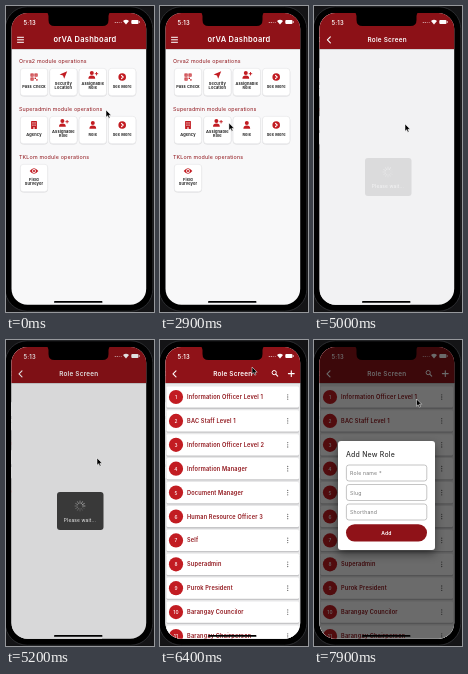
These frames come from a looping animation (148 px wide and 306 px high, 8000 ms). An HTML page:

```html
<!DOCTYPE html>
<html lang="en">
<head>
<meta charset="utf-8">
<title>Dashboard demo</title>
<style>
html, body { margin: 0; width: 100%; height: 100%; overflow: hidden; background: #141416; }
svg { display: block; width: 100vw; height: 100vh; }
text { font-family: Inter, "Open Sans", sans-serif; dominant-baseline: central; letter-spacing: .035em; }
</style>
</head>
<body>
<svg id="stage" viewBox="0 0 148 306"></svg>
<script>
const RED = '#8f1218', BRIGHT = '#c21c22';
const LOOP = 8000;

// Markup helpers
const rect = (x, y, w, h, fill, r = 0, more = '') =>
  `<rect x="${x}" y="${y}" width="${w}" height="${h}" rx="${r}" fill="${fill}" ${more}/>`;
const circle = (x, y, r, fill, more = '') =>
  `<circle cx="${x}" cy="${y}" r="${r}" fill="${fill}" ${more}/>`;
const path = (d, fill, more = '') => `<path d="${d}" fill="${fill}" ${more}/>`;
const line = (d, color, width = 1) =>
  path(d, 'none', `stroke="${color}" stroke-width="${width}" stroke-linecap="round" stroke-linejoin="round"`);
const text = (s, x, y, size, fill, weight = 400, anchor = 'start') =>
  `<text x="${x}" y="${y}" font-size="${size}" fill="${fill}" font-weight="${weight}" text-anchor="${anchor}">${s}</text>`;
const group = (id, body) => `<g id="${id}">${body}</g>`;

// Tile icons, drawn around 0,0
const person = circle(0, -2, 2, BRIGHT) + path('M-3.4 3.8Q-3.4 .6 0 .6T3.4 3.8Z', BRIGHT);
const icons = {
  blocks: [[-3.5, -3.5], [.5, -3.5], [-3.5, .5]].map(([x, y]) =>
    rect(x + .5, y + .5, 2.1, 2.1, 'none', 0, `stroke="${BRIGHT}"`)).join('') +
    rect(.6, .6, 1.4, 1.4, BRIGHT) + rect(2.2, 2.2, 1.4, 1.4, BRIGHT),
  arrow: path('M3.8-3.8L.8 3.8L-.4.4L-3.8-.6Z', BRIGHT),
  person,
  addPerson: `<g transform="translate(-1 0)">${person}</g>` + line('M2.4-1.3h2.6M3.7-2.6v2.6', BRIGHT, .9),
  more: circle(0, 0, 3.8, BRIGHT) + line('M-.7-1.7L1 0L-.7 1.7', '#fff', 1.1),
  building: rect(-2.9, -4, 5.8, 8, BRIGHT, .5) +
    [-2.6, -.4].map(y => rect(-1.6, y, 1.1, 1.1, '#fff') + rect(.5, y, 1.1, 1.1, '#fff')).join('') +
    rect(-.6, 2.2, 1.2, 1.8, '#fff'),
  eye: path('M-4.3 0Q0-5.6 4.3 0Q0 5.6-4.3 0Z', BRIGHT) + circle(0, 0, 1.9, '#fff') + circle(0, 0, 1.1, BRIGHT)
};

function tile(col, y, icon, label) {
  const x = 14 + col * 29.4, mid = x + 14, rows = label.split('|');
  const two = rows.length > 1;
  return rect(x, y + .5, 28, 28, '#dcdcde', 3.4) +
    rect(x + .3, y + .3, 27.4, 27.4, '#fff', 3.2, 'stroke="#e2e2e4" stroke-width=".5"') +
    `<g transform="translate(${mid} ${y + (two ? 7 : 9)})">${icons[icon]}</g>` +
    rows.map((s, i) => text(s, mid, y + (two ? 15.2 + i * 4.5 : 18), 3.9, '#222', 700, 'middle')).join('');
}

const section = (title, y, tiles) => text(title, 13, y, 5.3, RED) +
  tiles.map(([icon, label], i) => tile(i, y + 7, icon, label)).join('');

const header = (title, x, size) => rect(5, 43, 136, 1, '#0002') + rect(5, 6, 136, 37, RED) +
  text(title, x, 33.8, size, '#fff', 600, 'middle');

const dashboard = rect(5, 6, 136, 294, '#f8f8f9') + header('orVA Dashboard', 79, 7.5) +
  line('M11.5 31.3h6M11.5 33.8h6M11.5 36.3h6', '#fff', 1) +
  section('Orva2 module operations', 55, [['blocks', 'Pass Check'], ['arrow', 'Security|Location'],
    ['addPerson', 'Assignable|Role'], ['more', 'See More']]) +
  section('Superadmin module operations', 103, [['building', 'Agency'], ['addPerson', 'Assignable|Role'],
    ['person', 'Role'], ['more', 'See More']]) +
  section('TKLom module operations', 151, [['eye', 'Field|Surveyor']]);

const roles = ['Information Officer Level 1', 'BAC Staff Level 1', 'Information Officer Level 2',
  'Information Manager', 'Document Manager', 'Human Resource Officer 3', 'Self', 'Superadmin',
  'Purok President', 'Barangay Councilor', 'Barangay Chairperson'];

const roleRow = (name, i) => {
  const y = 57 + i * 23.9;
  return rect(6.5, y - 9.5, 132.5, 21.4, '#c6c6c8', 1.5) + rect(6.5, y - 10.6, 132.5, 21.2, '#fff', 1.5) +
    circle(16, y, 7.1, BRIGHT) + text(i + 1, 16, y, 4.8, '#fff', 500, 'middle') +
    text(name, 27, y, 5.6, RED, 600) +
    [-2.2, 0, 2.2].map(d => circle(127.7, y + d, .65, '#6d6d6d')).join('');
};

const rolePage = rect(5, 6, 136, 294, '#f6f6f7') +
  group('list', rect(5, 43, 136, 257, '#e8e8e9') + roles.map(roleRow).join('')) +
  header('Role Screen', 72.8, 6.4) + line('M16 30.8L13 33.8L16 36.8', '#fff', 1.1) +
  group('actions', circle(114.2, 32.6, 2.1, 'none', 'stroke="#fff" stroke-width="1"') +
    line('M115.9 34.3L117.7 36.2', '#fff', 1.1) + line('M128.4 33.6h5.8M131.3 30.7v5.8', '#fff', 1.1));

const ticks = Array.from({length: 12}, (_, i) =>
  `<line y1="-2.6" y2="-5" stroke="#fff" stroke-width=".7" stroke-linecap="round" opacity="${.12 + i * .05}" transform="rotate(${i * 30})"/>`).join('');
const loader = rect(5, 6, 136, 294, '#000', 0, 'opacity=".12"') + rect(51, 152, 46.5, 38, '#393939', 3) +
  `<g transform="translate(74 166)">${group('spinner', ticks)}</g>` +
  text('Please wait...', 74, 179.5, 4.8, '#eee', 400, 'middle');

const field = (label, y) => rect(32.4, y, 80.4, 16, '#fff', 2.5, 'stroke="#959595" stroke-width=".55"') +
  text(label, 36, y + 8, 5.2, '#7a7a7a');
const dialog = rect(24, 101, 97, 109, '#fff', 3, 'style="filter:drop-shadow(0 4px 5px #0007)"') +
  text('Add New Role', 32, 114, 6.9, '#333', 500) +
  field('Role name *', 125) + field('Slug', 144.5) + field('Shorthand', 164) +
  rect(32, 184.2, 81, 17.2, RED, 8.6) + text('Add', 72.5, 193, 5, '#fff', 600, 'middle');

const statusBar = text('5:13', 17.5, 16, 5.8, '#fff', 600) +
  [0, 1, 2, 3].map(i => circle(109.3 + i * 2, 16.5, .6, '#fff', `opacity="${i < 2 ? .8 : .5}"`)).join('') +
  path('M117 15Q120 12.6 123 15L120 18.4Z', '#fff') +
  rect(125.3, 14, 7.2, 4, '#fff', 1) + rect(133, 15.2, .7, 1.6, '#fff');

const stage = document.getElementById('stage');
stage.innerHTML =
  `<clipPath id="screen">${rect(5.5, 7, 134.7, 291.8, '#000', 16)}</clipPath>` +
  rect(-.8, .8, 147.6, 304.4, '#000', 22, 'stroke="#343539" stroke-width=".8"') +
  `<g clip-path="url(#screen)">` +
  group('home', dashboard) + group('role', rolePage) + statusBar + group('loader', loader) +
  group('splash', circle(131.3, 33.5, 10.3, '#fff', 'opacity=".2"')) +
  group('barrier', rect(5, 6, 136, 294, '#000')) + group('dialog', dialog) +
  rect(48, 295, 48.5, 1.8, '#000', .9) + '</g>' +
  path('M40 6H105Q102.5 7 102.5 10V14Q102.5 20 96.5 20H48.5Q42.5 20 42.5 14V10Q42.5 7 40 6Z', '#000') +
  group('cursor', path('M0 0V7.2L1.7 5.7L2.8 8.2L4 7.7L2.9 5.2H5.2Z', '#000', 'stroke="#fff" stroke-width=".5"'));

const el = id => document.getElementById(id);
const fade = (id, v) => { el(id).style.opacity = v; };
const shift = (id, x, y = 0) => el(id).setAttribute('transform', `translate(${x} ${y})`);
const ramp = (t, a, b) => Math.min(1, Math.max(0, (t - a) / (b - a)));
const smooth = p => p * p * (3 - 2 * p);

// Pointer stops: time, x, y
const stops = [[0, 100, 104], [2200, 100, 104], [3600, 38, 130], [3900, 38, 130], [4550, 91, 118],
  [5700, 91, 118], [6350, 92, 27], [6500, 92, 27], [7000, 134, 32], [7350, 134, 32], [7850, 102.5, 59]];

function pointer(t) {
  let i = stops.length - 1;
  while (stops[i][0] > t) i--;
  const a = stops[i], b = stops[i + 1] || a;
  const p = a === b ? 0 : smooth(ramp(t, a[0], b[0]));
  return [a[1] + (b[1] - a[1]) * p, a[2] + (b[2] - a[2]) * p];
}

function draw(now) {
  const t = now % LOOP;
  const slide = 1 - (1 - ramp(t, 4700, 5050)) ** 3;
  shift('home', -45 * slide);
  shift('role', 137 * (1 - slide));
  const loaded = t >= 5570 ? 1 : 0;
  fade('list', loaded);
  fade('actions', loaded);
  fade('loader', ramp(t, 4980, 5130) * (1 - ramp(t, 5400, 5540)));
  el('spinner').setAttribute('transform', `rotate(${Math.floor(t / 100) * 30})`);
  const open = ramp(t, 7120, 7300);
  fade('splash', ramp(t, 7050, 7150) * (1 - ramp(t, 7250, 7400)));
  fade('barrier', .58 * Math.sqrt(open));
  fade('dialog', open ** 1.2);
  shift('cursor', ...pointer(t));
  requestAnimationFrame(draw);
}
requestAnimationFrame(draw);
</script>
</body>
</html>
```
